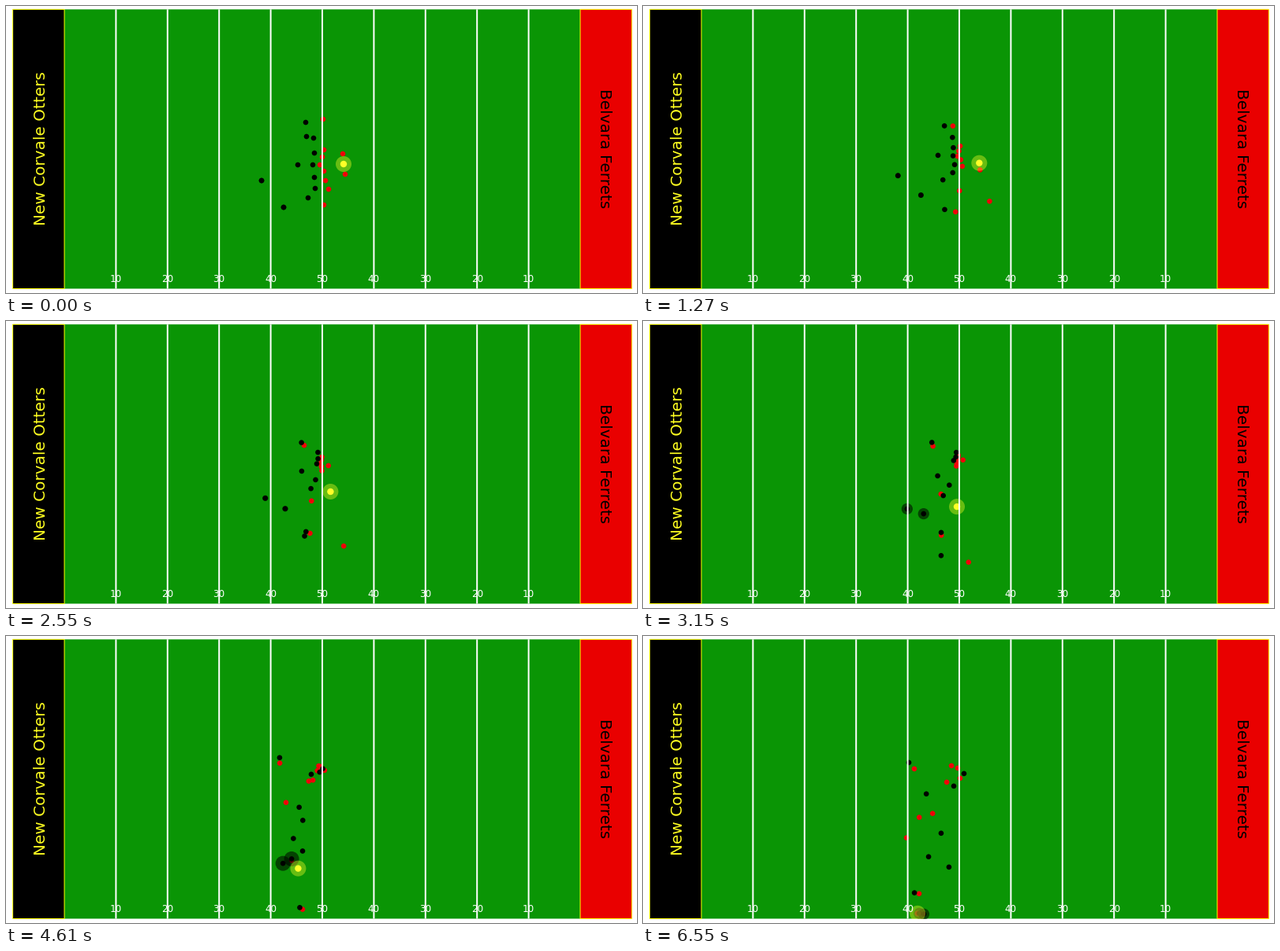
Animation of 800x365 px, one loop 6.58 s. Source, as a matplotlib script:

```python
import numpy as np
import matplotlib.pyplot as plt
from matplotlib.animation import FuncAnimation
from matplotlib.patches import Circle, Rectangle

W, H, DPI = 800, 365, 100
FRAMES, STEP = 329, 20          # 6580 ms loop
PLAY = 6.55                     # seconds from first to last pose
PX = 72 / DPI                   # one pixel in points

GREEN, RED, BLACK = "#0a9505", "#e90000", "#000000"
DOT_RED, YELLOW, EDGE = "#f00008", "#ffff28", "#ffff00"

plt.rcParams["font.family"] = "DejaVu Sans"
fig = plt.figure(figsize=(W / DPI, H / DPI), dpi=DPI, facecolor="white")
ax = fig.add_axes([0, 0, 1, 1])
ax.set_xlim(0, W)
ax.set_ylim(H, 0)
ax.axis("off")

# Field
LEFT, TOP, BOTTOM, TEN = 8.6, 4.3, 359.5, 65.4


def box(col, cols, **style):
    return ax.add_patch(Rectangle((LEFT + col * TEN, TOP), cols * TEN,
                                  BOTTOM - TOP, snap=False, **style))


field = box(0, 12, fc=GREEN, lw=0, zorder=0)
for col, color in ((0, BLACK), (11, RED)):
    box(col, 1, fc=color, ec=EDGE, lw=PX, zorder=1)

for i in range(1, 10):
    x = LEFT + (i + 1) * TEN
    ax.plot([x, x], [TOP, BOTTOM], color="white", lw=2 * PX, snap=False,
            solid_capstyle="butt", zorder=8)
    ax.text(x, 351, str(10 * min(i, 10 - i)), color="white", size=12 * PX,
            ha="center", va="baseline", zorder=9)


def team_name(x, text, color, angle):
    ax.text(x, 181.2, text, color=color, size=20 * PX, rotation=angle,
            rotation_mode="anchor", ha="center", va="baseline", zorder=9)


team_name(49.6, "New Corvale Otters", "#ffff20", 90)
team_name(752.6, "Belvara Ferrets", BLACK, 270)


# Motion
def ease(t, start, end):
    u = np.clip((t - start) / (end - start), 0, 1)
    return u * u * (3 - 2 * u)


def route(*points):
    """Smooth path through points evenly spaced over the play."""
    p = np.array(points, float)
    last = len(p) - 1
    m = np.gradient(p, axis=0, edge_order=min(2, last))

    def at(t):
        s = min(t / PLAY, 1) * last
        i = min(int(s), last - 1)
        u = s - i
        return (p[i] + (p[i + 1] - p[i]) * u * u * (3 - 2 * u)
                + m[i] * u * (1 - u) ** 2 - m[i + 1] * u * u * (1 - u))

    return at


def follow(lead, *gaps):
    """Stay near another player while the gap changes."""
    gap = route(*gaps)
    return lambda t: lead(t) + gap(t)


def lineman(start, end):
    """Push into the pile, then peel off."""
    pile = np.array([399, 166])
    return route(start, (start + pile) / 2, 0.75 * pile + 0.25 * np.array(end), end)


# The ball goes from passer to runner
carry = [(428, 201), (426, 200), (410, 219), (379, 268), (364, 320), (348, 353)]
ball_at = route(*carry)
runner = route((427, 188), (427, 209), *carry[2:])
passer = route(*carry[:2], (408, 183), (405, 170), (403, 174), (402, 181))

wide = route((402, 144), (383, 157), (349, 161), (344, 169))
flat = route((430, 214), (434, 275), (380, 343), (356, 366))
blocker = route((403, 253), (389, 268), (364, 282), (350, 328))
guard = route((409, 233), (392, 232), (358, 210), (334, 257))
attack = [
    passer, runner, wide, flat, blocker, guard,
    lineman((403, 183), (391, 165)),
    lineman((401, 192), (399, 168)),
    lineman((398, 202), (385, 186)),
    lineman((403, 210), (367, 226)),
    lineman((405, 222), (350, 231)),
]

rusher = route((391, 218), (394, 200), (378, 230), (362, 281))
safety = follow(ball_at, (-104, 21), (-91, 11), (-24, -6), (2, 0))
corner = follow(safety, (28, 34), (27, 17), (12, -5), (6, 1))
defence = [
    rusher, safety, corner,
    follow(rusher, (1, 14), (-8, 14), (-18, 46)),
    follow(rusher, (-21, -16), (-14, -12), (16, -30)),
    follow(blocker, (-20, -9), (1, -4), (38, -34)),
    follow(wide, (-22, 4), (-1, -5), (-7, -8)),
    follow(flat, (-49, -48), (-55, -16), (-6, -3), (-4, -1)),
    lineman((390, 168), (407, 175)),
    lineman((391, 187), (394, 191)),
    lineman((389, 202), (359, 201)),
]


def disc(color, r, z, alpha=1):
    c = Circle((-50, -50), r, fc=color, lw=0, alpha=alpha, zorder=z)
    ax.add_patch(c)
    c.set_clip_path(field)
    return c


movers = [(disc(DOT_RED, 3.3, 3), path) for path in attack]
movers += [(disc(BLACK, 3.3, 4), path) for path in defence]
shades = [disc(BLACK, 3, 5, 0.55) for _ in range(2)]
halo = disc(YELLOW, 10, 6, 0.38)
ball = disc(YELLOW, 4.2, 7)
movers += [(halo, ball_at), (ball, ball_at)]
movers += list(zip(shades, (safety, corner)))


def draw(n):
    t = n * STEP / 1000
    for c, path in movers:
        c.center = path(t)
    # Tacklers glow as they close in, and the tackle dims the ball
    for c in shades:
        c.radius = 3.5 + 6 * ease(t, 2.4, 3.7) - 2.5 * ease(t, 5.7, 6.5)
    ball.set_alpha(1 - 0.9 * ease(t, 5.0, 5.6))
    return []


anim = FuncAnimation(fig, draw, frames=FRAMES, interval=STEP,
                     init_func=lambda: draw(0), repeat=True,
                     repeat_delay=0, blit=False)
plt.show()
```
